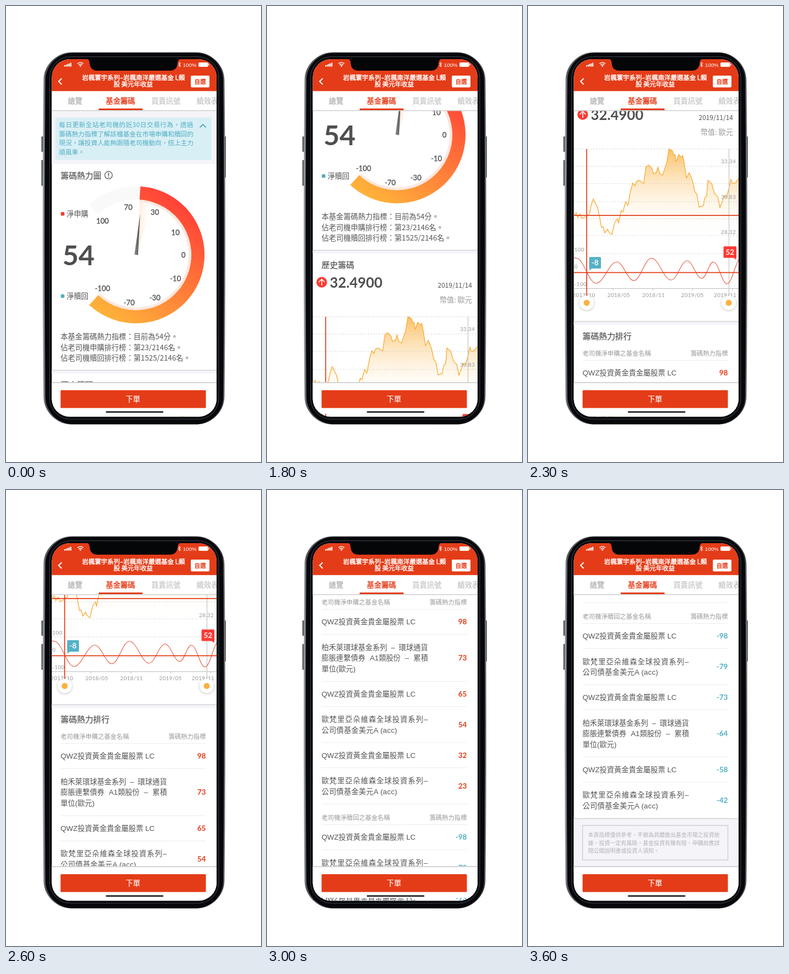
Animation, 465 px wide and 832 px high, one loop 4600 ms. Source, as an HTML page:

```html
<!DOCTYPE html>
<html lang="zh-Hant">
<head>
<meta charset="utf-8">
<title>籌碼熱力圖</title>
<style>
html, body { margin: 0; width: 100%; height: 100%; overflow: hidden; background: #fff; }
svg { display: block; width: 100%; height: 100%; }
text { font-family: "Noto Sans CJK TC", "Noto Sans CJK", sans-serif; white-space: pre; }
.lato { font-family: Lato, sans-serif; }
.row { font-family: "Liberation Sans", "Noto Sans CJK TC", "Noto Sans CJK", sans-serif; }
.b { font-weight: 700; }
.m { stroke: currentColor; stroke-width: .18; }
.h { stroke: currentColor; stroke-width: .4; }
.r { text-anchor: end; }
.c { text-anchor: middle; }
</style>
</head>
<body>
<svg id="stage" viewBox="0 0 465 832">
  <defs>
    <clipPath id="screen"><rect x="83.5" y="97" width="300.5" height="652.5" rx="33"/></clipPath>
    <clipPath id="view"><rect x="83" y="191" width="302" height="560"/></clipPath>
    <linearGradient id="rim">
      <stop offset="0" stop-color="#b4b6b9"/><stop offset=".014" stop-color="#55585c"/>
      <stop offset=".985" stop-color="#3a3d41"/><stop offset="1" stop-color="#85888c"/>
    </linearGradient>
    <linearGradient id="heat" gradientUnits="userSpaceOnUse" x1="300" y1="340" x2="160" y2="545">
      <stop offset="0" stop-color="#ff4037"/><stop offset="1" stop-color="#ffb03a"/>
    </linearGradient>
    <linearGradient id="glow" gradientUnits="userSpaceOnUse" x1="240" y1="0" x2="268" y2="0">
      <stop offset="0" stop-color="#ffe9d8"/><stop offset="1" stop-color="#fff" stop-opacity="0"/>
    </linearGradient>
    <linearGradient id="needle" x1="0" x2="1">
      <stop offset="0" stop-color="#8d8d8d"/><stop offset="1" stop-color="#4c4c4c"/>
    </linearGradient>
    <linearGradient id="area" gradientUnits="userSpaceOnUse" x1="0" y1="261" x2="0" y2="419">
      <stop offset="0" stop-color="#fcc064"/><stop offset="1" stop-color="#fff" stop-opacity="0"/>
    </linearGradient>
    <filter id="soft" x="-50%" y="-50%" width="200%" height="200%">
      <feDropShadow dx="0" dy="1" stdDeviation="2" flood-opacity=".28"/>
    </filter>
  </defs>
  <g id="phone"></g>
  <g clip-path="url(#screen)">
    <rect x="80" y="90" width="310" height="670" fill="#fff"/>
    <g clip-path="url(#view)"><g id="page"></g></g>
    <g id="chrome"></g>
  </g>
  <path d="M147 96Q152 97 152.5 104Q153.5 118 167 118H298Q312 118 313 104Q313.5 97 319 96Z" fill="#050608"/>
</svg>
<script>
const RED = '#e43c18', TEAL = '#50aec2', DARK = '#4f4f4f', GREY = '#999', PALE = '#f4f4f9';
const $ = id => document.getElementById(id);

const text = (x, y, s, size, fill, cls = '', extra = '') =>
  `<text x="${x}" y="${y}" font-size="${size}" fill="${fill}" color="${fill}" class="${cls}" ${extra}>${s}</text>`;
const rect = (x, y, w, h, fill, rx = 0, extra = '') =>
  `<rect x="${x}" y="${y}" width="${w}" height="${h}" fill="${fill}" rx="${rx}" ${extra}/>`;
const path = (d, stroke, width = 1, fill = 'none', extra = '') =>
  `<path d="${d}" stroke="${stroke}" stroke-width="${width}" fill="${fill}" ${extra}/>`;
const circle = (x, y, r, fill, extra = '') =>
  `<circle cx="${x}" cy="${y}" r="${r}" fill="${fill}" ${extra}/>`;
const gap = (y, h) => rect(83, y, 302, h, PALE) + rect(83, y - .7, 302, 1.6, '#d6d6d8');

// Rounded body whose long sides bow out slightly.
function body(l, t, r, b, rad, fill) {
  const k = rad * .45, mid = (t + b) / 2;
  return `<path fill="${fill}" d="M${l} ${t + rad}C${l} ${t + k} ${l + k} ${t} ${l + rad} ${t}H${r - rad}` +
    `C${r - k} ${t} ${r} ${t + k} ${r} ${t + rad}Q${r + 3} ${mid} ${r} ${b - rad}` +
    `C${r} ${b - k} ${r - k} ${b} ${r - rad} ${b}H${l + rad}` +
    `C${l + k} ${b} ${l} ${b - k} ${l} ${b - rad}Q${l - 3} ${mid} ${l} ${t + rad}Z"/>`;
}

function phone() {
  return rect(64.5, 238, 4, 28, '#55585c', 1) + rect(64.5, 281, 4, 47, '#55585c', 1) +
    rect(397, 238, 4, 75, '#55585c', 1) +
    body(68.3, 84.5, 398.5, 763.5, 52, 'url(#rim)') +
    body(72, 85.5, 396, 763, 50, '#07080b') +
    rect(79.5, 92.5, 308.5, 661.5, 'none', 38, 'stroke="#4d5258" stroke-width=".8"');
}

function chrome() {
  let s = rect(83, 90, 302, 65.5, RED);
  for (let i = 0; i < 5; i++) s += rect(106 + i * 2.8, 108 - i * 1.1, 2, 2.6 + i * 1.1, '#fff', .5);
  s += path('M130.3 105.3Q135.7 100.6 141.1 105.3M132.4 107.6Q135.7 104.8 139 107.6', '#fff', 1.5) +
    circle(135.7, 109.4, 1.3, '#fff') +
    path('M314 104.5L318.5 109 316.3 111.3V102.5L318.5 104.8 314 109.3', '#fff', .9) +
    text(322.5, 110.6, '100%', 9.8, '#fff', 'row') +
    rect(351, 103, 17.5, 8, '#fff', 1.8) + rect(369.2, 105.3, 1.3, 3.4, '#fff', .6);
  s += path('M101.5 132.2L96 137.6 101.5 143', '#fff', 2) +
    text(232.5, 134.6, '岩楓寰宇系列–岩楓南洋嚴選基金 L類', 11.5, '#fff', 'c h') +
    text(232, 147.4, '股 美元年收益', 11.5, '#fff', 'c h') +
    rect(337, 127, 34, 21.5, '#fff', 2) + text(354, 141.6, '自選', 10.5, RED, 'c h');
  s += rect(83, 155.5, 302, 35, '#fff') + rect(83, 190, 302, 1.6, '#d3d3d5') +
    text(126, 178.4, '總覽', 13.2, '#b9b9b9', 'c h') +
    text(208.7, 178.4, '基金籌碼', 13.3, RED, 'c h') +
    text(291.5, 178.4, '買賣訊號', 13.3, '#bfbfbf', 'c m') +
    text(347.5, 178.4, '績效表現', 13.3, '#bfbfbf', 'm') +
    rect(169, 187, 80, 3, RED);
  s += rect(83, 686.5, 302, 57.5, '#fff') + rect(83, 686.3, 302, 1.8, '#cfcfd2') +
    rect(99.5, 701, 265, 32.5, RED, 1.5) + text(231.5, 722, '下單', 13.3, '#fff', 'c m') +
    rect(182, 739.5, 105, 2.4, '#111', 1.2);
  return s;
}

function notice() {
  let s = rect(83, 191, 302, 97, PALE) + rect(90, 203.5, 284.5, 77.5, '#d9eff6');
  ['每日更新全站老司機的近30日交易行為，透過', '籌碼熱力指標了解該檔基金在市場申購和贖回的',
    '現況，讓投資人能夠跟隨老司機動向，搭上主力', '順風車。'].forEach((line, i) => {
    s += text(96.5, 221.4 + i * 16.4, line, 11.7, TEAL, '', i ? '' : 'letter-spacing=".5"');
  });
  return s + path('M353.5 221.5L359 216 364.5 221.5', TEAL, 1.8);
}

// Annular sector; angles in degrees, clockwise from the top.
function ring(r0, r1, a0, a1, fill) {
  const at = (r, a) => [237 + r * Math.sin(a * Math.PI / 180), 454 - r * Math.cos(a * Math.PI / 180)].map(v => v.toFixed(2));
  const big = a1 - a0 > 180 ? 1 : 0;
  return `<path fill="${fill}" d="M${at(r1, a0)}A${r1} ${r1} 0 ${big} 1 ${at(r1, a1)}L${at(r0, a1)}A${r0} ${r0} 0 ${big} 0 ${at(r0, a0)}Z"/>`;
}

function gauge() {
  let s = text(99.5, 314.5, '籌碼熱力圖', 14.9, DARK, 'm') +
    circle(187, 308.7, 6.8, 'none', `stroke="${DARK}" stroke-width="1.2"`) +
    rect(186.2, 304.3, 1.6, 5.6, DARK) + rect(186.2, 311.3, 1.6, 1.7, DARK);
  s += ring(101, 125, -43, 3.7, '#f9f9f9') +
    ring(96, 101.5, 3.7, 223, '#fde8df') +
    ring(101, 125, 3.7, 223, 'url(#heat)') +
    '<path d="M238 452L244 357Q256 357 268 362Z" fill="url(#glow)"/>' +
    '<path d="M234.3 453.6L244.6 379.5 240.8 454.6Z" fill="url(#needle)"/>';
  [[100, 176, 392], [70, 223, 367], [30, 271.5, 376], [10, 309, 413], [0, 323.5, 454],
    [-10, 309, 497], [-30, 271.5, 532], [-70, 224.5, 541], [-100, 176, 515.5]].forEach(([v, x, y]) => {
    s += text(x, y + 4.8, v, 13.2, '#555', 'lato c h');
  });
  s += text(103, 473, '54', 50.5, DARK, 'lato b') +
    rect(100, 376, 6.5, 6.5, '#f8372d', 1.5) + text(110.5, 384, '淨申購', 13.2, DARK) +
    rect(100, 526, 6.5, 6.5, TEAL, 1.5) + text(110.5, 534, '淨贖回', 13.2, DARK);
  ['本基金籌碼熱力指標：目前為54分。', '佔老司機申購排行榜：第23/2146名。', '佔老司機贖回排行榜：第1525/2146名。']
    .forEach((line, i) => { s += text(99.5, 608 + i * 19.5, line, 13.3, '#555'); });
  return s + gap(664.5, 6);
}

const price = '85 381 88 377 91 386 95 379 98 387 103 386 107 382 112 379 115 364 119 352 127 368 130 382 134 404 137 403 ' +
  '140 414 145 407 148 413 153 417 158 396 163 388 165 396 170 373 173 376 178 357 182 364 187 338 191 323 195 328 198 320 ' +
  '203 318 211 324 215 294 220 290 226 296 229 306 234 304';
const price2 = '237 294 240 305 245 309 249 298 253 286 257 261 263 264 266 272 268 271 270 284 275 271 279 276 282 273 284 281 ' +
  '289 314 294 304 300 319 304 338 308 344 312 367 320 364 322 351 326 346 328 318 335 324 340 342 346 348 350 368 355 354 ' +
  '358 346 362 349 366 334 370 316 373 324 378 323 384 315';
const wave = [[84, 459], [88, 460], [124, 506], [162, 467], [193, 501], [225, 460], [261, 500], [290, 465], [317, 497], [338, 467], [363, 507], [389, 459]];

function badge(x, y, w, label, fill, tail) {
  return rect(x, y, w, 21, fill, 1.5) + `<path d="M${tail} ${y + 20}v4.5l${tail < 200 ? 5 : -5} -4z" fill="${fill}"/>` +
    text(x + w / 2, y + 15.3, label, 13.5, '#fff', 'lato b c');
}

function chart() {
  let s = text(99.5, 172, '歷史籌碼', 14.9, DARK, 'm') +
    circle(99.8, 198, 9.7, '#ff3a33') +
    path('M99.8 204V192.5M94.3 198L99.8 192.3 105.3 198', '#fff', 1.6) +
    text(114.5, 208, '32.4900', 25.8, DARK, 'lato b') +
    text(374, 208, '2019/11/14', 12, '#555', 'r') +
    text(374, 234.5, '幣值: 歐元', 13.2, GREY, 'r');
  s += `<path d="M85 420L${price} ${price2}V420Z" fill="url(#area)"/>`;
  for (const y of [261, 292.5, 324, 357, 388, 419, 452]) s += path(`M84 ${y}H384`, '#cfcfcf', 1, 'none', 'stroke-dasharray="2 3"');
  s += path('M' + price + ' ' + price2, '#f8b03c', 1.4, 'none', 'stroke-linejoin="round"');
  s += path('M366.5 261V530', '#c4c4c4', 1.2) + path('M84 515.5H384', '#bbb');
  ['33.34', '30.83', '28.32'].forEach((v, i) => { s += text(379, 287.3 + i * 64.2, v, 10, GREY, 'lato r', 'letter-spacing=".3"'); });
  ['100', '0', '-100'].forEach((v, i) => { s += text(84.5, 447.5 + i * 31.5, v, 10, GREY, 'lato', 'letter-spacing=".3"'); });
  [['2017/10', 102], ['2018/05', 165.5], ['2018/11', 229], ['2019/05', 300], ['2019/11', 359.5]].forEach(([v, x]) => {
    s += text(x, 530.7, v, 10, GREY, 'lato c', 'letter-spacing=".3"');
  });
  for (const x of [155, 228, 300, 373]) s += path(`M${x} 515V519`, '#bbb');
  const d = wave.map(([x, y], i) => {
    if (!i) return `M${x} ${y}`;
    const [px, py] = wave[i - 1], k = (x - px) * .37;
    return `C${px + k} ${py} ${x - k} ${y} ${x} ${y}`;
  }).join('');
  s += path(d, '#e4573c', 1.1) +
    path('M84 382.2H384M84 486.3H384M107 261V530', RED, 1.7);
  s += badge(111.5, 458, 21.5, '-8', '#55b1c6', 112) + badge(356.5, 438.5, 23.5, '52', '#ff3a33', 379.5);
  for (const x of [107, 366]) s += circle(x, 541.5, 13, '#fff', 'filter="url(#soft)"') + circle(x, 541.5, 5.5, '#fbb040');
  return `<g transform="translate(0 525)">${s}</g>` + gap(1100.5, 6);
}

const funds = {
  a: [['QWZ投資黃金貴金屬股票 LC']],
  b: [['柏禾萊環球基金系列 – 環球通貨', 'word-spacing="3.2"'], ['膨脹連繫債券 A1類股份 – 累積', 'word-spacing="4.4"'], ['單位(歐元)']],
  c: [['歐梵里亞朵維森全球投資系列–', 'letter-spacing="1.03"'], ['公司債基金美元A (acc)', 'letter-spacing=".25"']]
};

function list(y, title, rows, color) {
  let s = text(99.5, y - 9, title, 11.35, GREY) + text(364.5, y - 9, '籌碼熱力指標', 11.35, GREY, 'r') +
    rect(99.5, y - .5, 265, 1, '#ececec');
  for (const [key, value] of rows) {
    const lines = funds[key], h = 25.7 + 20.1 * lines.length, mid = y + h / 2;
    lines.forEach(([line, extra], i) => {
      s += text(99.5, mid + 5 + (i - (lines.length - 1) / 2) * 19.5, line, 13.3, '#555', 'row', extra);
    });
    s += text(364.5, mid + 4.9, value, 13.6, color, 'lato b r');
    y += h;
    s += rect(99.5, y - .5, 265, 1, '#ececec');
  }
  return s;
}

function ranking() {
  let s = text(99.5, 1133.3, '籌碼熱力排行', 14.9, DARK, 'm') +
    list(1171.5, '老司機淨申購之基金名稱', [['a', 98], ['b', 73], ['a', 65], ['c', 54], ['a', 32], ['c', 23]], RED) +
    list(1564.5, '老司機淨贖回之基金名稱', [['a', -98], ['c', -79], ['a', -73], ['b', -64], ['a', -58], ['c', -42]], TEAL);
  s += gap(1920.5, 98) + rect(99.5, 1933, 265, 63, 'none', 0, 'stroke="#cfcfd2" stroke-width="1.4"');
  ['本頁指標僅供參考，不做為具體進出基金市場之投資依', '據，投資一定有風險，基金投資有賺有賠，申購前應詳', '閱公開說明書或投資人須知。']
    .forEach((line, i) => { s += text(109.5, 1953.8 + i * 14.8, line, 10, '#b4b4b6'); });
  return s;
}

$('phone').innerHTML = phone();
$('chrome').innerHTML = chrome();
$('page').innerHTML = notice() + gauge() + chart() + ranking();

const LOOP = 4600, START = 1500, STEP = 100, LAST = 21;

// The page scrolls at constant speed in hard 100 ms steps, then rests.
function scrollAt(t) {
  if (t < START) return 0;
  return 35 + Math.min(LAST, Math.floor((t - START) / STEP)) * 61.24;
}

const t0 = performance.now();
function draw() {
  const t = Math.max(0, performance.now() - t0) % LOOP;
  $('page').setAttribute('transform', `translate(0 ${-Math.round(scrollAt(t))})`);
  requestAnimationFrame(draw);
}
draw();
</script>
</body>
</html>
```
